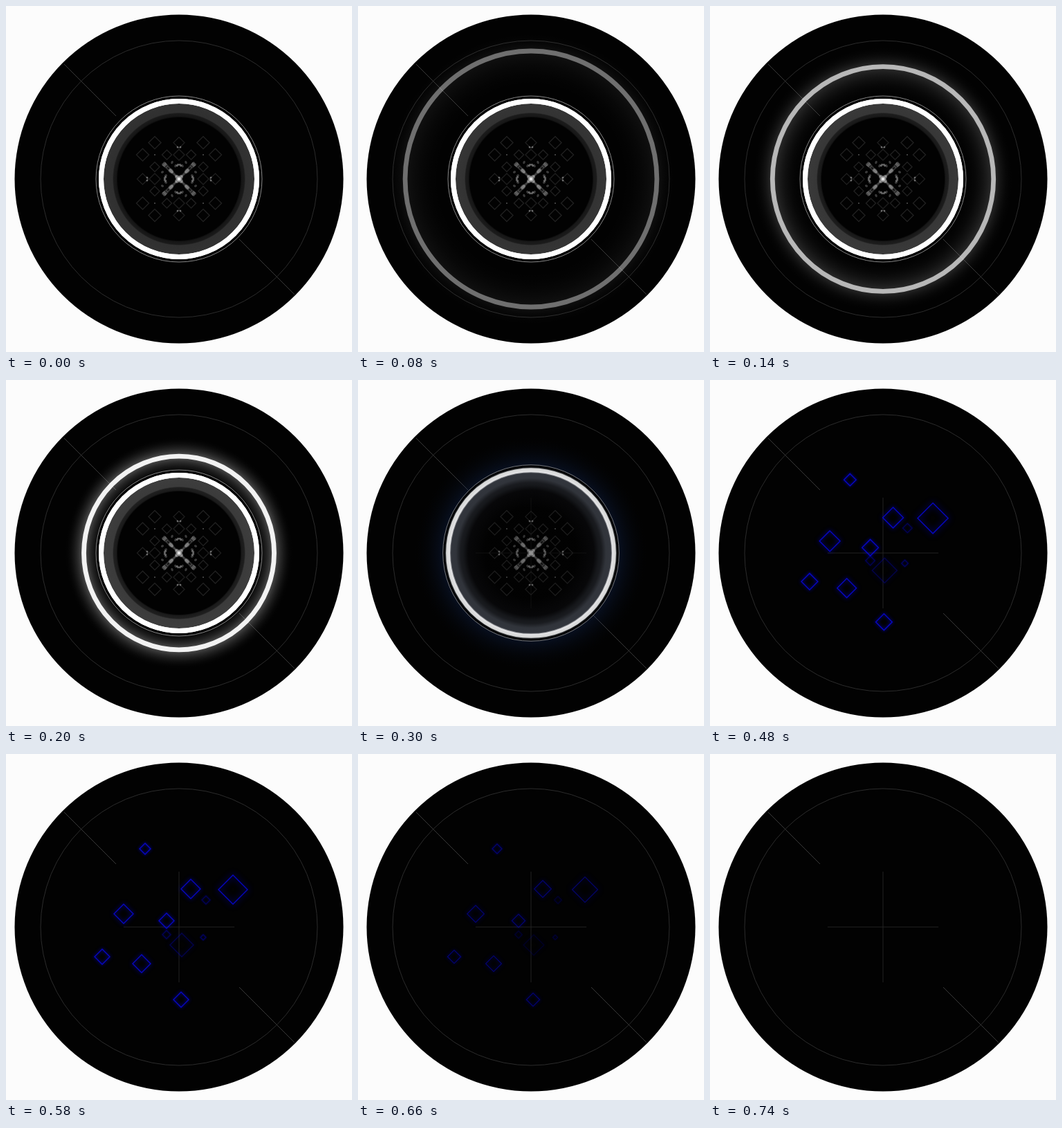
These frames come from a looping animation (500 by 500 pixels, 1 s). An HTML page with a canvas:

```html
<!DOCTYPE html>
<html lang="en">
<head>
<meta charset="utf-8">
<title>Pulse</title>
<style>
html, body { margin: 0; width: 100%; height: 100%; overflow: hidden; background: #fcfcfc; }
canvas { display: block; width: 100vw; height: 100vh; }
</style>
</head>
<body>
<canvas id="stage" width="500" height="500"></canvas>
<script>
const ctx = document.getElementById('stage').getContext('2d');
const LOOP = 1000, STEP = 20, TAU = Math.PI * 2;

const lerp = (a, b, k) => a + (b - a) * k;
const ramp = (t, from, to) => Math.max(0, Math.min(1, (t - from) / (to - from)));
const smooth = k => k * k * (3 - 2 * k);
const easeOut = (k, power = 2) => 1 - Math.pow(1 - k, power);
const white = a => `rgba(255,255,255,${a})`;

function line(c, x0, y0, x1, y1, color, width = 1) {
  c.strokeStyle = color;
  c.lineWidth = width;
  c.beginPath();
  c.moveTo(x0, y0);
  c.lineTo(x1, y1);
  c.stroke();
}

function diamond(c, x, y, r, color, width) {
  c.strokeStyle = color;
  c.lineWidth = width;
  c.beginPath();
  c.moveTo(x, y - r);
  c.lineTo(x + r, y);
  c.lineTo(x, y + r);
  c.lineTo(x - r, y);
  c.closePath();
  c.stroke();
}

function ring(r, width, color, squash = 1) {
  ctx.strokeStyle = color;
  ctx.lineWidth = width;
  ctx.beginPath();
  ctx.ellipse(0, 0, r, r * squash, 0, 0, TAU);
  ctx.stroke();
}

function disc(r, fill) {
  ctx.fillStyle = fill;
  ctx.beginPath();
  ctx.arc(0, 0, r, 0, TAU);
  ctx.fill();
}

// Soft halo that peaks at one radius and dies out at two others
function halo(inner, peak, outer, rgb, alpha) {
  const g = ctx.createRadialGradient(0, 0, inner, 0, 0, outer);
  const mid = (peak - inner) / (outer - inner);
  for (let i = 0; i <= 8; i++) {
    const k = i / 8;
    g.addColorStop(k * mid, `rgba(${rgb},${alpha * k * k})`);
    g.addColorStop(1 - k * (1 - mid), `rgba(${rgb},${alpha * k * k})`);
  }
  disc(outer, g);
}

// Eightfold ornament: beaded arms, chevrons and a lattice of diamonds
function makeFlake() {
  const cv = document.createElement('canvas');
  cv.width = cv.height = 160;
  const c = cv.getContext('2d');
  const cell = 17.5;
  const blob = (x, y, rx, ry, angle, a) => {
    c.fillStyle = white(a);
    c.beginPath();
    c.ellipse(x, y, rx, ry, angle, 0, TAU);
    c.fill();
  };
  c.filter = 'blur(0.6px)';
  c.lineCap = 'round';
  for (let i = 0; i < 8; i++) {
    c.setTransform(1, 0, 0, 1, 80, 80);
    c.rotate((i >> 1) * Math.PI / 2);
    if (i & 1) c.scale(-1, 1);
    line(c, 0, 0, 23, 20, white(.2), 2.2);
    for (let n = 0; n < 3; n++) {
      const d = 2 + n * 10;
      blob(d, d * .92, 4.5 - n * .6, 3 - n * .5, .7, .24);
    }
    for (let n = 1; n < 3; n++) {
      const y = (n + 1) * cell;
      diamond(c, 0, y, 8, white(.06), 1.5);
      diamond(c, n * cell, y, 5 + n * 2, white(.12), 1.5);
      blob(2, n * 26 - 6, 2.6 / n, 1.6, -.8, .4);
      blob(n * 5, 14 + n * 5, 1.6, 2.2, .5, .24);
      blob(n * cell, n * cell, .9, .9, 0, .2);
    }
  }
  return cv;
}
const flake = makeFlake();

// Resting x, y and size of each gem, relative to the centre
const brightGems = [
  [-49, -113, 8], [17, -55, 14], [78, -54, 21], [-80, -19, 14],
  [-18, -9, 11], [-111, 43, 11], [-54, 53, 13], [3, 105, 11]
];
const faintGems = [[4, 26, 17], [39, -39, 6], [-18, 11, 6], [35, 15, 4]];
const BURST = { x: -25, y: 13 };

function drawBase() {
  ctx.fillStyle = '#fcfcfc';
  ctx.fillRect(-250, -250, 500, 500);
  disc(237.5, '#020202');
  ring(200, 1, '#2b2b2b');
  line(ctx, -166, -166, -91, -91, '#383838');
  line(ctx, 87, 87, 167, 167, '#383838');
}

function drawCross(t) {
  ctx.globalAlpha = ramp(t, 220, 400);
  line(ctx, -80, 0, 80, 0, '#222');
  line(ctx, 0, -80, 0, 80, '#222');
  ctx.globalAlpha = 1;
}

function drawIncoming(t) {
  if (t < STEP || t > 280) return;
  const r = 211.5 - .37 * t;
  const a = (.045 + .0044 * t) * (1 - ramp(t, 220, 280));
  const squash = 1.017;
  ctx.save();
  ctx.scale(1, squash);
  halo(r - lerp(60, 28, ramp(t, 60, 200)), r, r + 28, '255,255,255', .4 * a * a);
  ctx.restore();
  ring(r, 6.8, white(a), squash);
}

function drawCore(t) {
  const a = 1 - smooth(ramp(t, 250, 450));
  if (a <= 0) return;
  const R = 112.5 + 11.5 * easeOut(ramp(t, 220, 420));
  const hit = ramp(t, 220, 300);

  const blue = hit * (1 - ramp(t, 300, 400));
  halo(R - 5, R + 2, R + 50, '25,55,120', .3 * blue);

  // Inner band with a darker rim, cooling to blue after the hit
  const v = lerp(51, 62, ramp(t, 40, 200));
  const shade = k => `rgb(${v * k},${(v + 4 * hit) * k},${(v + 13 * hit) * k})`;
  const edge = 5 * hit;
  const g = ctx.createRadialGradient(0, 0, 0, 0, 0, R);
  const stop = (r, color) => g.addColorStop(r / R, color);
  stop(R * .55, '#020202');
  stop(R - 24 - edge, shade(.04 + .1 * hit));
  stop(R - 22, shade(.42));
  stop(R - 18, shade(.5));
  stop(R - 16.5 + edge, shade(.95));
  stop(R, shade(1));
  ctx.globalAlpha = a;
  disc(R + 7, '#020202');
  ctx.globalAlpha = a * lerp(a, 1, a);
  disc(R, g);

  ctx.globalAlpha = a;
  ring(R + 7.5, 1, '#858585');
  ring(R, 7 + hit, white(lerp(1, .3, hit)));
  ring(R, 7 - hit, white(lerp(1, .94, hit)));

  ctx.globalAlpha = a * .95;
  ctx.drawImage(flake, -80, -80);
  ctx.globalAlpha = 1;
}

function drawGem([x, y, r], t, alpha) {
  const open = lerp(.27, 1, easeOut(ramp(t, 400, 540), 3));
  const settle = ramp(open, .27, 1);
  const out = ramp(t, 580, 740);
  const size = lerp(r * 1.2 + 9, r, settle) * (1 - .25 * out);
  ctx.save();
  ctx.globalAlpha = alpha * (1 - out) * lerp(.5 * ramp(t, 340, 400), 1, settle);
  ctx.shadowColor = '#00f';
  ctx.shadowBlur = lerp(8, 1 + r * .4, settle);
  diamond(ctx, lerp(BURST.x, x, open), lerp(BURST.y, y, open), size,
    '#0808dc', lerp(2.4, 1.4, settle));
  ctx.restore();
}

function drawGems(t) {
  if (t < 340 || t >= 740) return;
  brightGems.forEach(gem => drawGem(gem, t, .85));
  faintGems.forEach(gem => drawGem(gem, t, .3));
}

function draw(t) {
  ctx.setTransform(1, 0, 0, 1, 250, 250);
  drawBase();
  drawIncoming(t);
  drawCore(t);
  drawCross(t);
  drawGems(t);
}

const start = performance.now();
function tick() {
  const t = (performance.now() - start) % LOOP;
  draw(Math.floor(t / STEP) * STEP);
  requestAnimationFrame(tick);
}
tick();
</script>
</body>
</html>
```
